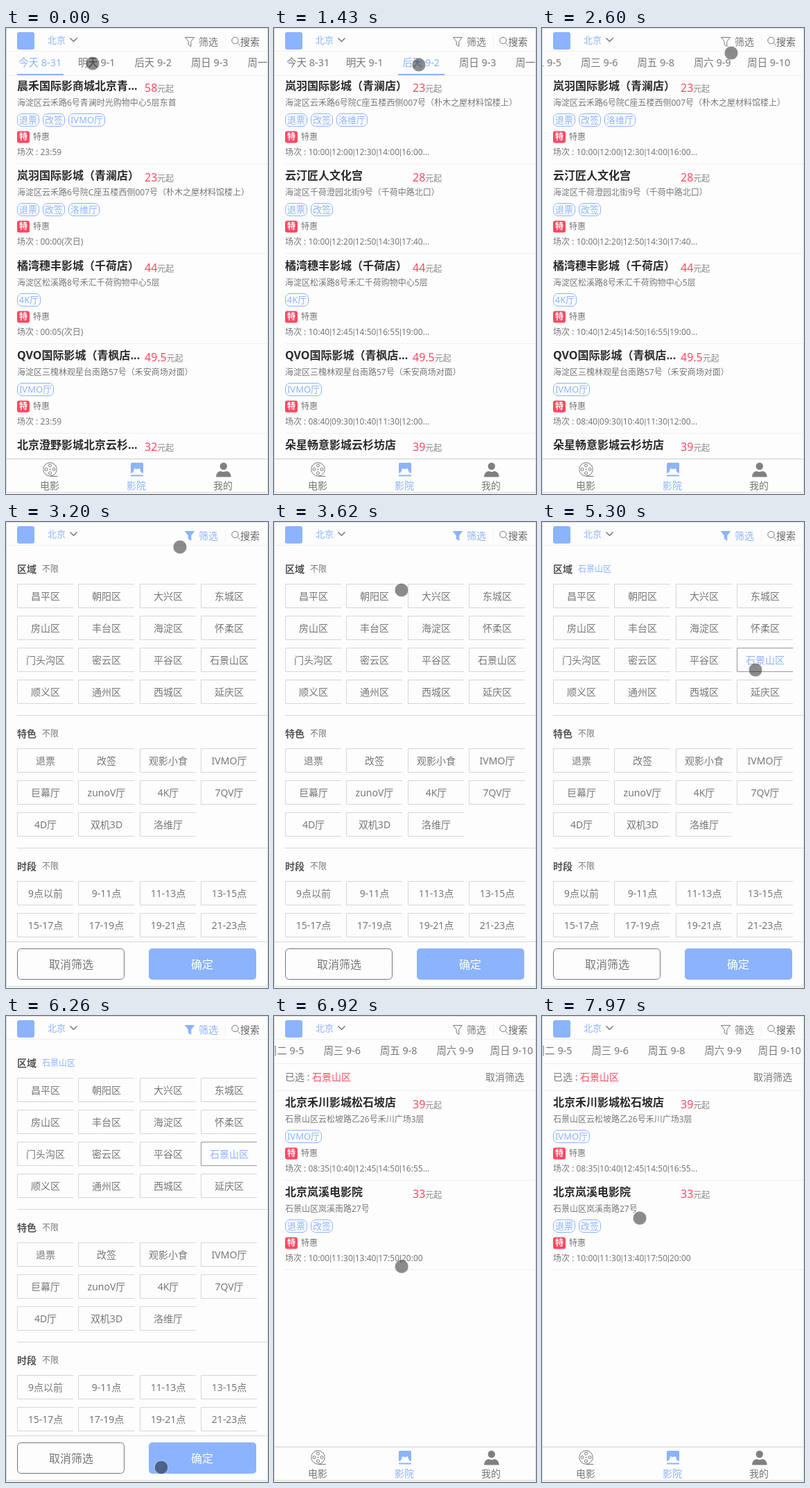
Recreate the animation shown at these times as an HTML page. Size 378x671 px, loop 8 s.

```html
<!DOCTYPE html>
<html lang="zh-CN">
<head>
<meta charset="utf-8">
<title>影院</title>
<style>
html, body { margin: 0; width: 100%; height: 100%; overflow: hidden; background: #fdfdfd; }
svg { display: block; width: 100vw; height: 100vh; }
text { font-family: "Noto Sans", "Noto Sans CJK SC", "Noto Sans CJK", sans-serif; white-space: pre; }
.bar { font-family: Roboto, sans-serif; }
</style>
</head>
<body>
<svg id="stage" viewBox="0 0 378 671"></svg>
<script>
const LOOP = 8000;
const BLUE = '#8cb3fd', RED = '#ff4961', GREY = '#777', LINE = '#d6d6d6', FAINT = '#efefef', PAPER = '#fdfdfd';
const SANS = '"Noto Sans", "Noto Sans CJK SC", "Noto Sans CJK", sans-serif';
const BOLD = 'font-weight="700"';

// Drawing helpers; text is placed by its vertical middle.
const text = (x, y, s, size, fill = GREY, more = '') =>
  `<text x="${x}" y="${Math.round(y + size * 0.37)}" font-size="${size}" fill="${fill}" ${more}>${s}</text>`;
const mid = (x, y, s, size, fill = GREY, more = '') => text(x, y, s, size, fill, 'text-anchor="middle" ' + more);
const rect = (x, y, w, h, fill, more = '') =>
  `<rect x="${x}" y="${y}" width="${w}" height="${h}" fill="${fill}" ${more}/>`;
const rule = (y, x = 1, fill = FAINT) => rect(x, y, 377 - x, 1, fill);
const path = (d, stroke, more = '') => `<path d="${d}" fill="none" stroke="${stroke}" ${more}/>`;
const ring = (x, y, r, stroke = GREY) => `<circle cx="${x}" cy="${y}" r="${r}" fill="none" stroke="${stroke}"/>`;
const group = (id, body, more = '') => `<g id="${id}" ${more}>${body}</g>`;

const pen = document.createElement('canvas').getContext('2d');
const widthOf = (s, size) => {
  pen.font = `${size}px ${SANS}`;
  return pen.measureText(s).width;
};

// Cinemas: name, price, address, tags
const BIG = 'IVMO厅', SOUND = '洛维厅', REFUND = ['退票', '改签'];
const cinemas = {
  chen: ['晨禾国际影商城北京青...', '58', '海淀区云禾路6号青澜时光购物中心5层东首', [...REFUND, BIG]],
  lan: ['岚羽国际影城（青澜店）', '23', '海淀区云禾路6号院C座五楼西侧007号（朴木之屋材料馆楼上）', [...REFUND, SOUND]],
  hall: ['云汀匠人文化宫', '28', '海淀区千荷澄园北街9号（千荷中路北口）', REFUND],
  ju: ['橘湾穗丰影城（千荷店）', '44', '海淀区松溪路8号禾汇千荷购物中心5层', ['4K厅']],
  qvo: ['QVO国际影城（青枫店...', '49.5', '海淀区三槐林观星台南路57号（禾安商场对面）', [BIG]],
  ye: ['北京澄野影城北京云杉...', '32', '', []],
  duo: ['朵星畅意影城云杉坊店', '39', '', []],
  he: ['北京禾川影城松石坡店', '39', '石景山区云松坡路乙26号禾川广场3层', [BIG]],
  xi: ['北京岚溪电影院', '33', '石景山区岚溪南路27号', REFUND]
};
const lanTimes = '10:00|12:00|12:30|14:00|16:00...';
const hallTimes = '10:00|12:20|12:50|14:30|17:40...';
const juTimes = '10:40|12:45|14:50|16:55|19:00...';
const lists = {
  today: [['chen', '23:59'], ['lan', '00:00(次日)'], ['ju', '00:05(次日)'], ['qvo', '23:59'], ['ye', '']],
  tomorrow: [['chen', '10:10|12:20|14:30|16:40|18:50...'], ['lan', lanTimes], ['hall', hallTimes], ['ju', juTimes], ['qvo', '']],
  after: [['lan', lanTimes], ['hall', hallTimes], ['ju', juTimes], ['qvo', '08:40|09:30|10:40|11:30|12:00...'], ['duo', '']],
  found: [['he', '08:35|10:40|12:45|14:50|16:55...'], ['xi', '10:00|11:30|13:40|17:50|20:00']]
};

function card([key, times], y) {
  const [name, price, address, tags] = cinemas[key];
  let x = 16;
  const pills = tags.map(s => {
    const w = Math.round(widthOf(s, 13) + 6);
    const pill = rect(x + 0.5, y + 57.5, w - 1, 18, 'none', `rx="6.5" stroke="${BLUE}"`) +
      mid(x + w / 2, y + 66.5, s, 13, BLUE);
    x += w + 5;
    return pill;
  }).join('');
  return text(16, y + 17, name, 16, '#2a2a2a', BOLD) +
    text(200, y + 20, `${price}<tspan font-size="12" fill="#888">元起</tspan>`, 16, RED) +
    text(16, y + 42, address, 12) + pills +
    rect(16, y + 82.5, 18, 17, RED, 'rx="3"') + mid(25, y + 91, '特', 12, '#fff', BOLD) +
    text(39, y + 91, '特惠', 12) +
    text(16, y + 112.5, '场次 : ' + times.replaceAll('|', '<tspan class="bar">|</tspan>'), 12) +
    rule(y + 129, 16);
}
const list = (id, top) =>
  group(id, lists[id].map((row, i) => card(row, Math.round(top + i * 129.35))).join(''), 'clip-path="url(#page)"');

// Date tabs
const days = ['今天 8-31', '明天 9-1', '后天 9-2', '周日 9-3', '周一 9-4',
  '周二 9-5', '周三 9-6', '周五 9-8', '周六 9-9', '周日 9-10'];
const dayX = i => 49.2 + i * 81.5;
const dates = group('dates', group('strip',
  days.map((s, i) => mid(dayX(i), 50, s, 14.4, GREY, `id="day${i}"`)).join('') +
  rect(0, 66, 67, 2, BLUE, 'id="mark"')), 'clip-path="url(#page)"') + rule(68);

// Top and bottom bars
const header = rect(16, 6, 25, 25, BLUE, 'rx="3"') +
  text(60, 17, '北京', 13, BLUE) +
  path('M92.5 14.5l5 5 5-5', GREY, 'stroke-width="1.5"') +
  path('M258.5 13.5h13l-4.7 6v7l-3.6-2.4v-4.6z', GREY, 'id="funnel" stroke-linejoin="round"') +
  text(278, 20, '筛选', 14, GREY, 'id="filterLabel"') +
  rect(316, 11, 1, 17, FAINT) +
  ring(330.5, 18, 4.7) + path('M334 21.5l4 4', GREY) +
  text(338, 20, '搜索', 14, '#666') + rule(33);

const reel = ring(63.5, 635.5, 9.7) + ring(63.5, 635.5, 0.6) + path('M64 645.5h10.5', GREY) +
  [0, 1, 2, 3].map(i => ring(63.5 + 5.4 * Math.cos(i * Math.PI / 2), 635.5 + 5.4 * Math.sin(i * Math.PI / 2), 2)).join('');
const screen = rect(180, 626, 18, 15, BLUE, 'rx="1.5"') +
  `<path d="M185 634q4 2 8 0 .5 5 3.500 7h-15q3-2 3.500-7z" fill="${PAPER}"/>` + rect(180, 643.5, 18, 2, BLUE);
const person = `<g fill="#808080"><circle cx="313.8" cy="631" r="5.2"/>
  <path d="M303 646.5q0-7 6.5-8.5 4.3 2 8.600 0 6.7 1.5 6.700 8.5z"/></g>`;
const footer = rect(1, 620, 376, 48, PAPER) + rule(620, 1, '#ccc') + reel + screen + person +
  ['电影', '影院', '我的'].map((s, i) => mid(63 + i * 125, 659, s, 14, i === 1 ? BLUE : GREY)).join('');

const chosen = group('chosen', text(16, 88, '已选 : ', 14) + text(55, 88, '石景山区', 14, RED) +
  text(305, 88, '取消筛选', 14) + rule(107));

// Filter panel
const PICK = '石景山区';
const hours = [9, 11, 13, 15, 17, 19, 21].map(h => `${h}-${h + 2}点`);
const sections = {
  区域: `昌平区 朝阳区 大兴区 东城区 房山区 丰台区 海淀区 怀柔区 门头沟区 密云区 平谷区 ${PICK} 顺义区 通州区 西城区 延庆区`.split(' '),
  特色: `退票 改签 观影小食 ${BIG} 巨幕厅 zunoV厅 4K厅 7QV厅 4D厅 双机3D ${SOUND}`.split(' '),
  时段: ['9点以前', ...hours]
};
function option(s, i, top) {
  const x = Math.round(16 + (i % 4) * 88.3), y = top + Math.floor(i / 4) * 46;
  const id = part => s === PICK ? `id="pick${part}"` : '';
  return path(`M${x + 81} ${y + 0.5}H${x + 0.5}V${y + 34.5}H${x + 81}`, LINE, id('Box')) +
    mid(x + 41, y + 18, s, 14, GREY, id('Text'));
}
function filters() {
  let y = 68, out = '';
  for (const [title, names] of Object.entries(sections)) {
    out += text(16, y, title, 14, '#555', BOLD) + text(52, y, '不限', 12, GREY, `id="${title}"`) +
      names.map((s, i) => option(s, i, y + 21)).join('');
    y += 53 + Math.ceil(names.length / 4) * 46;
    out += rule(y - 27, 16, LINE);
  }
  return out;
}
const panel = group('panel', rect(1, 34, 376, 634, PAPER) + filters() +
  rect(1, 604, 376, 64, PAPER) + rule(604, 1, LINE) +
  rect(16.5, 614.5, 154, 44, PAPER, `rx="5" stroke="${GREY}"`) + mid(94, 637, '取消筛选', 16) +
  rect(206, 614, 155, 45, BLUE, 'rx="5"') + mid(283, 637, '确定', 16, '#fff'));

const $ = id => document.getElementById(id);
$('stage').innerHTML =
  `<defs><clipPath id="page">${rect(1, 34, 376, 586, '#000')}</clipPath></defs>` +
  rect(0, 0, 378, 671, '#f3f3f3') + rect(0.5, 0.5, 377, 668, PAPER, 'stroke="#dcdcdc"') +
  ['today', 'tomorrow', 'after'].map(id => list(id, 66)).join('') + list('found', 107) +
  dates + chosen + footer + panel + header +
  '<circle id="touch" r="9.8" fill-opacity=".45" stroke="#fff" stroke-opacity=".5"/>';

// Motion: the pointer eases between the places it visits: time, x, y.
const visits = [[0, 125, 51], [900, 123, 51], [1430, 209, 53], [1950, 318, 52], [2230, 190, 53],
  [2600, 273, 36], [3050, 265, 23], [3620, 184, 98], [4160, 97, 148], [5300, 308, 213],
  [5800, 70, 480], [6260, 224, 650], [6450, 227, 660], [7310, 152, 136], [7970, 141, 291]];
const ease = (t, from, to) => {
  const u = Math.min(1, Math.max(0, (t - from) / (to - from)));
  return u * u * (3 - 2 * u);
};
function pointer(t) {
  const last = visits.length - 1;
  const i = Math.min(last, Math.max(1, visits.findIndex(v => v[0] > t) + (t >= visits[last][0] ? last + 1 : 0)));
  const [t0, x0, y0] = visits[i - 1], [t1, x1, y1] = visits[i];
  const u = ease(t, t0, t1);
  return [x0 + (x1 - x0) * u, y0 + (y1 - y0) * u];
}
// A flick carries the dates past their end, then they settle back.
const scroll = t => 455.5 * ease(t, 1970, 2600) - 15.5 * ease(t, 2600, 2900);

const show = (id, on) => $(id).setAttribute('display', on ? 'inline' : 'none');
const paint = (id, color, attr = 'fill') => $(id).setAttribute(attr, color);

function draw(t) {
  const day = t < 650 ? 0 : t < 1300 ? 1 : 2;
  const open = t >= 3050 && t < 6500, found = t >= 6500, picked = t >= 5300;

  const current = found ? 'found' : ['today', 'tomorrow', 'after'][day];
  for (const id in lists) show(id, id === current);
  show('chosen', found);
  show('panel', open);

  days.forEach((_, i) => paint('day' + i, i === day ? BLUE : GREY));
  $('mark').setAttribute('x', dayX(day) - 33.2);
  $('strip').setAttribute('transform', `translate(${-scroll(t)} 0)`);

  paint('funnel', open ? BLUE : 'none');
  paint('funnel', open ? BLUE : GREY, 'stroke');
  paint('filterLabel', open ? BLUE : GREY);
  paint('pickText', picked ? BLUE : GREY);
  paint('pickBox', picked ? '#999' : LINE, 'stroke');
  paint('区域', picked ? BLUE : GREY);
  $('区域').textContent = picked ? PICK : '不限';

  const [x, y] = pointer(t);
  $('touch').setAttribute('cx', x);
  $('touch').setAttribute('cy', y);
}

const start = performance.now();
function tick() {
  draw((performance.now() - start) % LOOP);
  requestAnimationFrame(tick);
}
tick();
</script>
</body>
</html>
```
